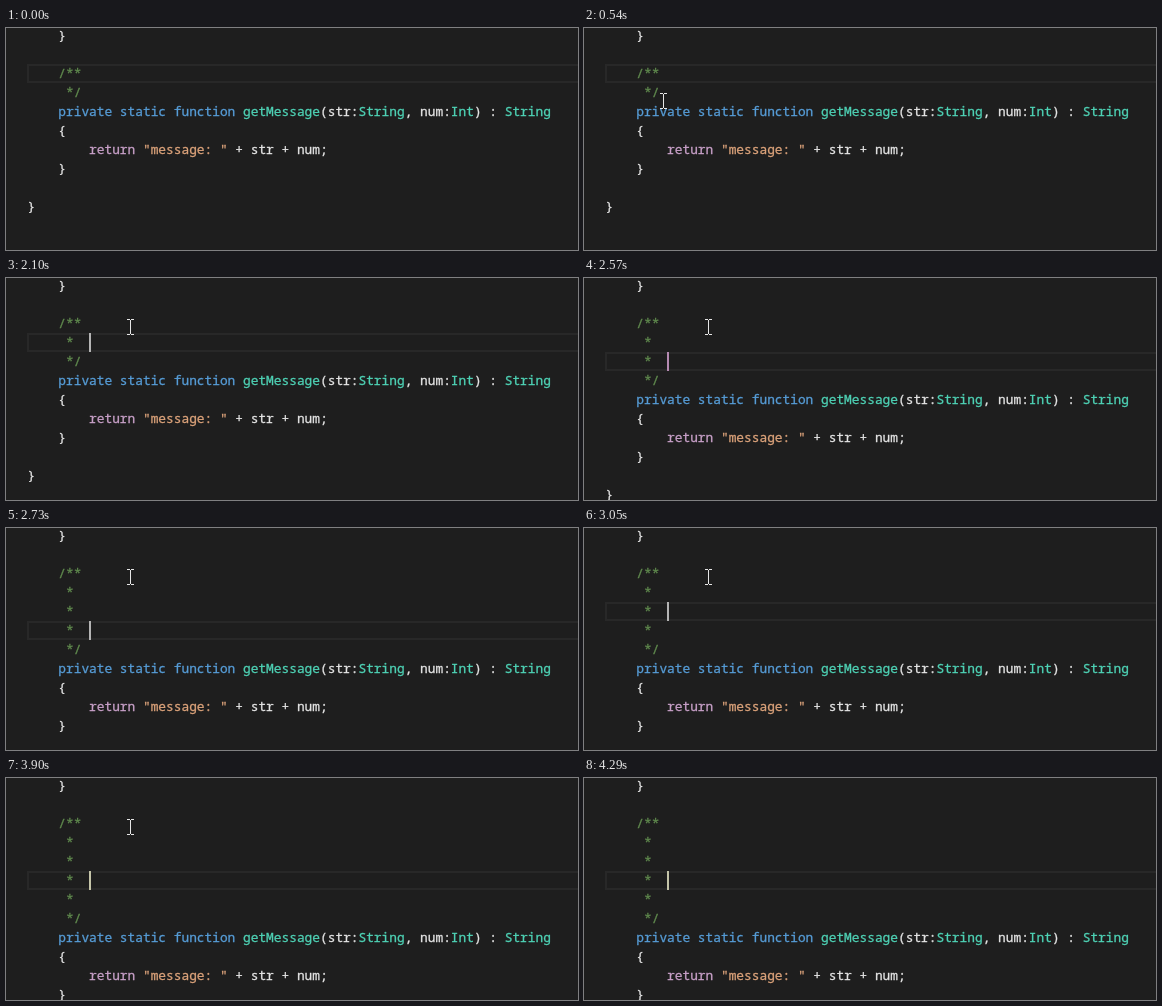
An HTML page with a canvas that plays this animation: 572x222 px, repeating every 6.47 s.

```html
<!DOCTYPE html>
<html lang="en">
<head>
<meta charset="utf-8">
<title>Doc comment editing</title>
<style>
html, body { margin: 0; width: 100%; height: 100%; overflow: hidden; background: #1e1e1e; }
canvas { display: block; }
</style>
</head>
<body>
<canvas id="stage" width="572" height="222"></canvas>
<script>
const ctx = document.getElementById('stage').getContext('2d');
const LOOP = 6470;
const LEFT = 21.5, CHAR = 7.697, ROW = 19, FIRST = -2;

const PLAIN = '#e4e4e4', COMMENT = '#608b4e', KEYWORD = '#569cd6',
      TYPE = '#4ed2b5', CONTROL = '#c8a0c8', STRING = '#dba27a', CARET = '#b4b4b4';

const BODY = [
  [4, ['private static function ', KEYWORD], ['getMessage', TYPE], ['(str:', PLAIN],
      ['String', TYPE], [', num:', PLAIN], ['Int', TYPE], [') : ', PLAIN], ['String', TYPE]],
  [4, ['{', PLAIN]],
  [8, ['return ', CONTROL], ['"message: "', STRING], [' + str + num;', PLAIN]],
  [4, ['}', PLAIN]],
  [0],
  [0, ['}', PLAIN]]
];

// Editor states: start time, star lines, active row, caret colour
const STATES = [
  { at: 0, stars: 0, row: 2, caret: null },
  { at: 2100, stars: 1, row: 3, caret: CARET },
  { at: 2570, stars: 2, row: 4, caret: '#b58ab2' },
  { at: 2730, stars: 3, row: 5, caret: CARET },
  { at: 3050, stars: 3, row: 4, caret: CARET },
  { at: 3430, stars: 4, row: 5, caret: CARET },
  { at: 3900, stars: 4, row: 5, caret: '#c4c4a8' }
];

const rowTop = row => FIRST + row * ROW;
const mix = (a, b, k) => a + (b - a) * k;

function drawLine(row, [col, ...tokens]) {
  const y = rowTop(row) + 14;
  for (const [text, color] of tokens) {
    ctx.fillStyle = ctx.strokeStyle = color;
    for (const ch of text) {
      const x = LEFT + col++ * CHAR;
      if (ch === ' ') continue;
      ctx.fillText(ch, x, y);
      ctx.strokeText(ch, x, y);
    }
  }
}

function drawHighlight(row) {
  ctx.strokeStyle = '#282828';
  ctx.lineWidth = 2;
  ctx.strokeRect(22, rowTop(row) + 1, 560, ROW - 2);
}

function bezier(points, k) {
  while (points.length > 1) {
    points = points.slice(1).map(([x, y], i) =>
      [mix(points[i][0], x, k), mix(points[i][1], y, k)]);
  }
  return points[0];
}

// The pointer is sampled in steps of about 80 ms
function pointerAt(t) {
  if (t < 220 || t >= 4290) return null;
  if (t < 930) {
    const k = Math.min(8, Math.floor((t - 220) / 78.75)) / 8;
    return bezier([[336, 133], [150, 104], [-10, 60], [121, 56]], 1 - (1 - k) ** 1.5);
  }
  if (t < 1010) return [123, 52];
  if (t < 4050) return [124, 49];
  const k = (Math.floor((t - 4050) / 80) + 1) / 3;
  return [mix(124, 227, k ** 1.4), mix(49, 206, k ** 1.3)];
}

function drawPointer([px, py]) {
  const x = Math.round(px), y = Math.round(py);
  ctx.fillStyle = '#e6e6e6';
  for (const edge of [-8, 7]) {
    ctx.fillRect(x - 3, y + edge, 3, 1);
    ctx.fillRect(x + 1, y + edge, 3, 1);
  }
  ctx.fillRect(x, y - 7, 1, 14);
}

function draw(t) {
  const state = STATES.filter(s => s.at <= t).pop();
  ctx.fillStyle = '#1e1e1e';
  ctx.fillRect(0, 0, 572, 222);
  drawHighlight(state.row);

  // A hairline stroke gives the glyphs their slightly heavier weight
  ctx.font = '12.83px "Noto Sans Mono", "DejaVu Sans Mono", monospace';
  ctx.lineWidth = 0.3;
  drawLine(0, [4, ['}', PLAIN]]);
  drawLine(2, [4, ['/**', COMMENT]]);
  let row = 3;
  for (let i = 0; i < state.stars; i++) drawLine(row++, [5, ['*', COMMENT]]);
  drawLine(row++, [5, ['*/', COMMENT]]);
  for (const line of BODY) drawLine(row++, line);

  if (state.caret) {
    ctx.fillStyle = state.caret;
    ctx.fillRect(83, rowTop(state.row), 2, ROW);
  }
  const pointer = pointerAt(t);
  if (pointer) drawPointer(pointer);
}

const start = performance.now();
function tick() {
  draw((performance.now() - start) % LOOP);
  requestAnimationFrame(tick);
}
tick();
</script>
</body>
</html>
```
